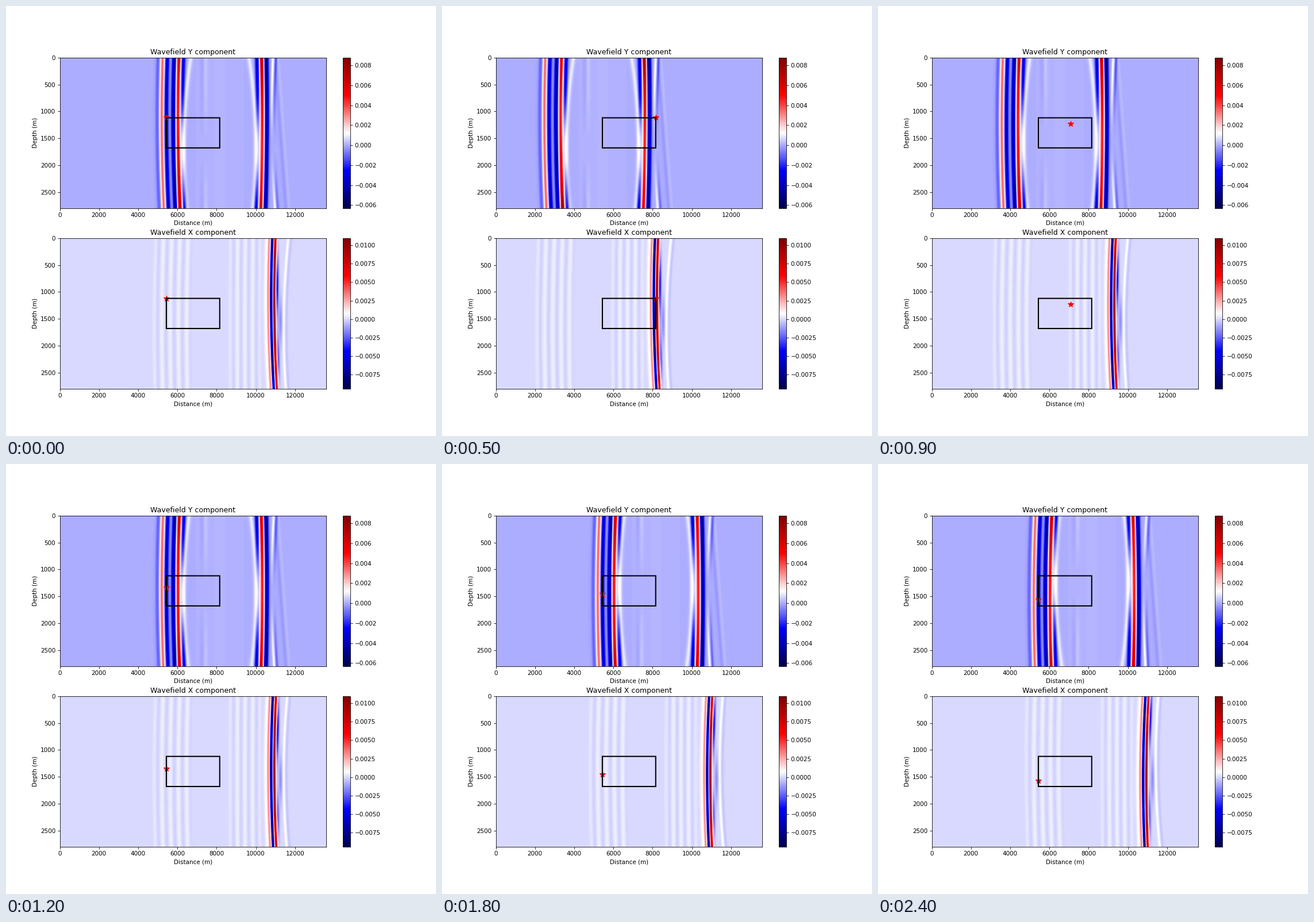
Recreate the animation shown at these times as a matplotlib script. Size 748 px wide and 748 px high, loop 2.5 s.

```python
import numpy as np
import matplotlib.pyplot as plt
from matplotlib.animation import FuncAnimation
from matplotlib.patches import Rectangle

INCHES, DPI = 10, 74.8
WIDTH, DEPTH = 13600, 2800
X0, Y0, DX, DY = 5440, 1120, 544, 112
COLS, FRAMES = 6, 25
NX, NY = 680, 140

x = (np.arange(NX) + 0.5) * WIDTH / NX
y = (np.arange(NY)[:, None] + 0.5) * DEPTH / NY


def bump(v, center, width):
    return np.exp(-0.5 * ((v - center) / width) ** 2)


def train(v, start, step, amps):
    """Evenly spaced pulses, one per amplitude."""
    return sum(a * bump(v, start + i * step, 0.3 * step)
               for i, a in enumerate(amps))


def ripples(v, first, last, gap):
    """Faint wave packet that fades out beyond its two ends."""
    window = 1 / (1 + np.exp((first - v) / 60)) / (1 + np.exp((v - last) / 60))
    return window * (0.00015 + 0.0003 * np.cos(2 * np.pi * (v - first) / gap))


def source(i):
    row, col = divmod(i, COLS)
    return X0 + col * DX, Y0 + row * DY


def coords(sx, sy):
    """Shifted distance, squared depth offset (km) from the source and its mirror."""
    return x + sx - X0, ((y - sy) / 1000) ** 2, ((y - DEPTH + sy) / 1000) ** 2


def field_y(sx, sy):
    u, d, m = coords(sx, sy)
    near = np.exp(-1.5 * m)
    far = 1 - near
    step = 237

    # Left group bends right with depth offset, right group bends left
    left, right = u - 37 * d, u + 26 * d
    f = train(left, 4950, step, [-0.0011, 0.0036, -0.0037])
    f = f + train(left, 5775, step, [-0.0046, 0.005 + 0.0011 * d, -0.0033 * far])
    f += train(right, 10073, step,
               [-0.0036 * far, 0.0048 + 0.0011 * m, -0.0044 - 0.0005 * m])
    f += train(u - 60 * d, 10790, 150, [0.0014 * far, -0.0012 * far])

    # White streaks bowing towards each other
    glow = 0.0009 + 0.0005 * near
    f += glow * (bump(u, 6300 + 130 * m, 75) + bump(u, 10000 - 130 * m, 75))

    # Weak trailing arrivals and the brighter gap between the groups
    f += far * train(u, 7230, 200, [-0.0002, 0.0003])
    f += train(u - 0.2 * y, 10950, 180, [-0.0003, 0.0002])
    return f + 0.00012 * bump(u, 8150, 1000)


def field_x(sx, sy):
    u, d, m = coords(sx, sy)
    w = u - 47 * d
    lobes = bump(y, 2000 - sy, 360) + 0.6 * bump(y, 2200, 280)
    f = train(w, 10616, 153,
              [0.0032, -0.0088 + 0.0006 * d, 0.0104 - 0.0011 * d, -0.0042 * lobes])
    f = f + 0.0007 * bump(w, 10480, 70)

    # Split tail behind the main front
    f -= 0.0015 * bump(y, 1550, 300) * bump(u, 11240, 65)
    f += train(u - 85 * m, 11400, 150, [0.0008, -0.0004])
    f += ripples(u - 30 * m, 4770, 6700, 420)
    return f + ripples(u - 10 * m, 8640, 10200, 390)


def panel(ax, name, low, high):
    im = ax.imshow(np.zeros((NY, NX)), cmap="seismic", vmin=low, vmax=high,
                   extent=(0, WIDTH, DEPTH, 0), aspect="auto")
    fig.colorbar(im, ax=ax)
    star, = ax.plot([X0], [Y0], "r*", markersize=10)
    ax.add_patch(Rectangle((X0, Y0), 5 * DX, 5 * DY, fill=False, ec="black",
                           lw=2, zorder=3, snap=False))
    ax.set(title=f"Wavefield {name} component", xlabel="Distance (m)",
           ylabel="Depth (m)", xlim=(0, WIDTH), ylim=(DEPTH, 0))
    return im, star


plt.rcParams["font.family"] = "DejaVu Sans"
fig, (top, bottom) = plt.subplots(2, 1, figsize=(INCHES, INCHES), dpi=DPI)
panels = [
    (*panel(top, "Y", -0.006293, 0.008759), field_y),
    (*panel(bottom, "X", -0.00944, 0.01097), field_x),
]


def update(i):
    sx, sy = source(i)
    for im, star, field in panels:
        im.set_data(field(sx, sy))
        star.set_data([sx], [sy])
    return [artist for im, star, _ in panels for artist in (im, star)]


anim = FuncAnimation(fig, update, frames=FRAMES, interval=100, repeat=True,
                     repeat_delay=0, blit=False)
plt.show()
```
